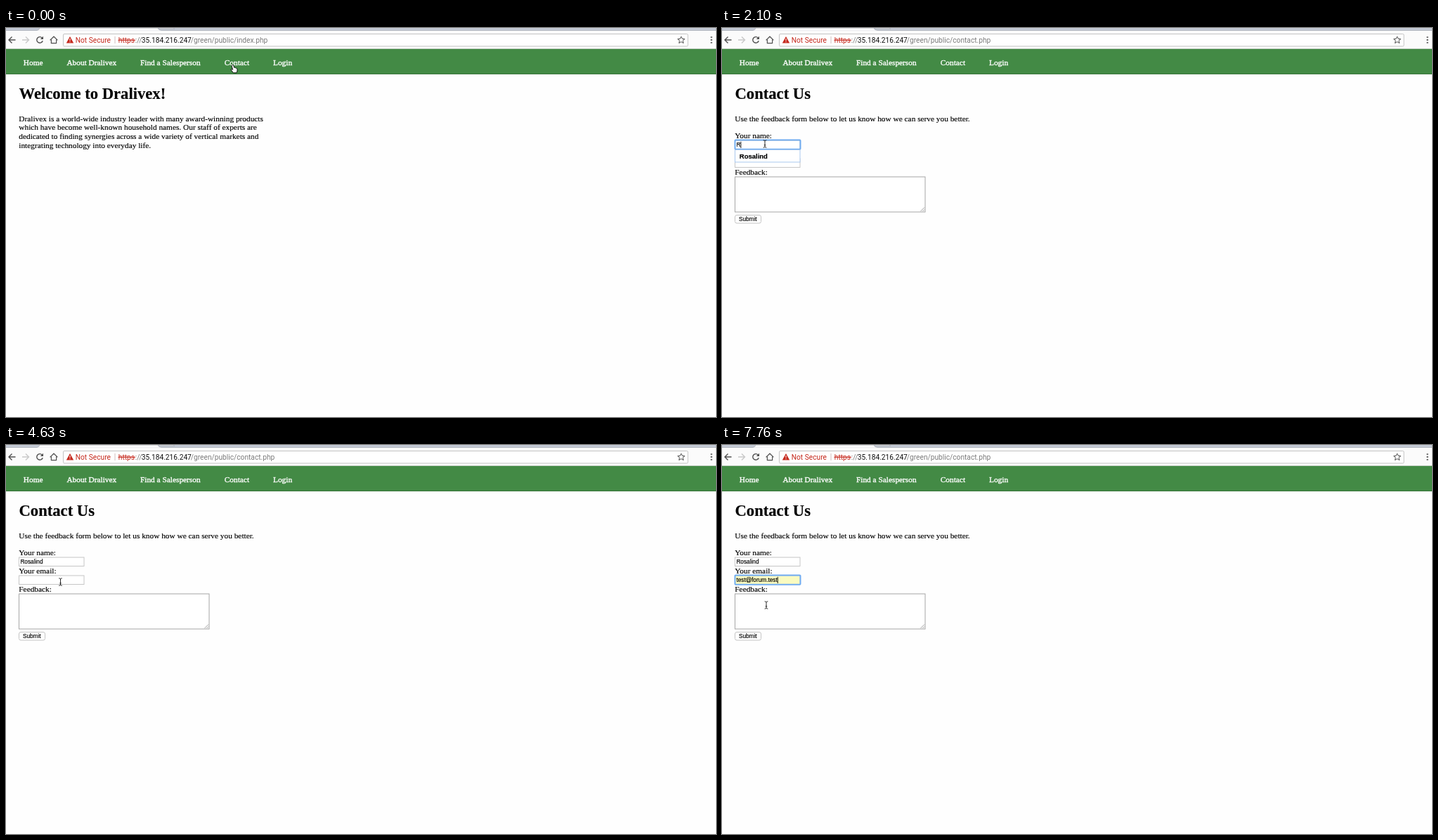
Write an HTML page that moves like this. It is 1010 px wide and 554 px high and loops after 8000 ms.

```html
<!DOCTYPE html>
<html lang="en">
<head>
<meta charset="utf-8">
<title>Contact form</title>
<style>
  html, body { margin: 0; width: 100%; height: 100%; overflow: hidden; background: #fefefe; }
  svg { display: block; }
  text { white-space: pre; }
  .page { font: 11.33px "Liberation Serif", Times, serif; }
  .page text { stroke: #000; stroke-width: .15px; }
  .page .title { font-size: 22.65px; font-weight: bold; }
  .page .nav text { fill: #fff; stroke: #fff; stroke-width: .35px; }
  .url { font: 10.2px Roboto, sans-serif; fill: #7b7b7b; }
  .url .warn { fill: #c5281c; }
  .url .host { fill: #111; }
  .icons { fill: none; stroke: #505050; stroke-width: 1.4; }
  .small { font: 8.25px "Liberation Sans", Arial, sans-serif; }
  .menu { font: bold 9.5px "Liberation Sans", Arial, sans-serif; }
  .field { fill: #fff; stroke: #c6c6c6; }
  .ring { fill: none; stroke: #70acf0; stroke-width: 2; }
  .box { fill: #fff; stroke: #a9c8ee; }
  .caret { stroke: #000; stroke-width: .9; }
</style>
</head>
<body>
<svg width="1010" height="554" viewBox="0 0 1010 554">
  <rect width="1010" height="554" fill="#fefefe"/>

  <!-- browser bar -->
  <rect width="1010" height="30" fill="#fbfbfb"/>
  <rect width="1010" height="3.5" fill="#c4cad5"/>
  <path d="M0 3.5H44Q47 3 48 0H216Q217 3 221 3.5H1010" fill="#fbfbfb" stroke="#a9adb5" stroke-width=".8"/>
  <path d="M217 0Q218 1.5 221 1.5H240L238 0Z" fill="#dfe2e7" stroke="#a9adb5" stroke-width=".6"/>
  <path d="M0 29.5H1010" stroke="#c3cec3"/>
  <rect x="81.5" y="8.5" width="888.5" height="17.5" rx="1.5" fill="#fff" stroke="#c3c3c3"/>
  <g class="icons">
    <path d="M13.5 17H4.5M8.5 12.5L4 17L8.5 21.5"/>
    <path d="M23 17H32M28 12.5L32.5 17L28 21.5" stroke="#c9c9c9"/>
    <g data-on="0 150 470 8000">
      <path d="M51.3 14A4.3 4.3 0 1 0 52.2 18.2"/>
      <path d="M53 11.8V16H48.8Z" fill="#505050" stroke="none"/>
    </g>
    <path data-on="150 470" d="M44 13L52 21M52 13L44 21"/>
    <path d="M62.6 17.4L68 12.2L73.4 17.4M64.4 16.5V21.7H71.6V16.5" stroke-width="1.2"/>
    <path d="M960.5 12L962 15.4L965.5 15.7L962.8 18L963.7 21.6L960.5 19.7L957.3 21.6L958.2 18L955.5 15.7L959 15.4Z" stroke-width="1"/>
    <path d="M1003.5 12.2v1.8M1003.5 16.1v1.8M1003.5 20v1.8" stroke-width="2"/>
  </g>
  <path d="M91 12L96.2 21.4H85.8Z" fill="#c5281c"/>
  <path d="M91 15V18.3M91 19.2V20.3" stroke="#fff"/>
  <path d="M155 12V22" stroke="#d2bcbc"/>
  <g class="url">
    <text class="warn" x="98.8" y="20.6">Not Secure</text>
    <text class="warn" x="159.8" y="20.6">https</text>
    <path d="M159.5 17.4H184" stroke="#c5281c"/>
    <text x="183.8" y="20.6">://</text>
    <text class="host" x="192.8" y="20.6">35.184.216.247</text>
    <text id="path" x="262.8" y="20.6"></text>
  </g>

  <g class="page">
    <g class="nav">
      <rect y="30" width="1010" height="36" fill="#438a45"/>
      <path d="M0 65.5H1010" stroke="#39763b"/>
      <text x="24.8" y="52.5">Home</text>
      <text x="86.4" y="52.5">About Dralivex</text>
      <text x="191" y="52.5">Find a Salesperson</text>
      <text x="310.8" y="52.5">Contact</text>
      <text x="380" y="52.5">Login</text>
    </g>

    <g data-on="0 470">
      <text class="title" x="18.5" y="101.3">Welcome to Dralivex!</text>
      <text x="18.3" y="132.6">Dralivex is a world-wide industry leader with many award-winning products</text>
      <text x="18.3" y="145.4">which have become well-known household names. Our staff of experts are</text>
      <text x="18.3" y="158.1">dedicated to finding synergies across a wide variety of vertical markets and</text>
      <text x="18.3" y="170.9">integrating technology into everyday life.</text>
    </g>

    <g data-on="470 8000">
      <text class="title" x="18.5" y="101.3">Contact Us</text>
      <text x="18.3" y="132.6">Use the feedback form below to let us know how we can serve you better.</text>
      <text x="18.3" y="156.8">Your name:</text>
      <text x="18.3" y="182.8">Your email:</text>
      <text x="18.3" y="208.8">Feedback:</text>
      <rect class="field" x="18.5" y="160" width="92.5" height="12.5"/>
      <rect class="field" x="18.5" y="186" width="92.5" height="12.5"/>
      <rect data-on="7310 8000" x="19" y="186.5" width="91.5" height="11.5" fill="#fafbc0"/>
      <rect x="18.5" y="212" width="270.5" height="50" fill="#fff" stroke="#a6a6a6"/>
      <path d="M282.5 261L288 255.5M285.5 261L288 258.5" stroke="#888" stroke-width=".8"/>
      <rect x="18.5" y="266.5" width="37" height="11.5" rx="2.5" fill="#fff" stroke="#c4c4c4"/>
      <text class="small" x="23.9" y="274.9">Submit</text>

      <rect class="ring" data-on="1650 4180" x="18.5" y="159.5" width="93" height="13.2" rx="1"/>
      <rect class="ring" data-on="4930 8000" x="18.5" y="185.5" width="93" height="13.2" rx="1"/>
      <text class="small" id="name" x="20.4" y="169.2"></text>
      <text class="small" id="email" x="20.4" y="195.2"></text>
      <path class="caret" id="nameCaret" data-on="1650 4180" d="M.5 161.8V171"/>
      <path class="caret" id="emailCaret" data-on="4930 5380 5820 7170 7760 8000" d="M.5 187.8V197"/>

      <g class="menu" data-on="2100 4180">
        <rect class="box" x="18.5" y="173.5" width="92.5" height="17.5"/>
        <text x="24.8" y="186.4">Rosalind</text>
      </g>
      <g class="menu" data-on="6120 7760">
        <rect class="box" x="18.5" y="199.3" width="117.2" height="35.2"/>
        <rect data-on="7310 7460" x="19" y="200.5" width="116.2" height="17" fill="#cdcdcd"/>
        <rect data-on="7460 7760" x="19" y="217.5" width="116.2" height="16.5" fill="#cdcdcd"/>
        <text x="24.8" y="212.6">test@marketplace.test</text>
        <text x="24.8" y="229.6">test@forum.test</text>
      </g>
    </g>
  </g>

  <!-- pointer shapes, each around its hot spot -->
  <g id="pointer">
    <path id="hand" d="M-2.2 -5.2Q-1 -6.2 -.4 -4.8L.6 -1.6Q1.6 -2.4 2.2 -1.2Q3.2 -1.8 3.6 -.6Q4.6 -.8 4.9 .6L5 3L4 5.8H-.6L-3.6 2Q-4.2 .4 -2.6 .6L-1.4 1.4L-2.8 -3.6Q-3 -4.7 -2.2 -5.2Z" fill="#fff" stroke="#000" stroke-width=".9"/>
    <path id="arrow" d="M0 0V10L2.3 8L4 11.6L5.7 10.8L4.1 7.3H7.2Z" fill="#000" stroke="#fff" stroke-width=".8"/>
    <path id="beam" d="M-2.3 -5.2Q-.2 -5.2 0 -4.2Q.2 -5.2 2.3 -5.2M0 -4.2V4.2M-2.3 5.2Q-.2 5.2 0 4.2Q.2 5.2 2.3 5.2M-1.2 1.8H1.2" fill="none" stroke="#111" stroke-width=".9"/>
  </g>
</svg>
<script>
  const LOOP = 8000, STEP = 147, SLACK = 10;
  const NAME = "Rosalind", EMAIL = "test@forum.test", OTHER = "test@marketplace.test";
  const nameKeys = [2100, 2400, 2550, 2700, 3000, 3150, 3290, 3440];
  const emailKeys = [6120, 6270, 6420, 6570];
  // start time, steps, end x, end y
  const moves = [
    [770, 6, 61, 165],
    [3740, 3, 173, 181],
    [4330, 3, 77.5, 195],
    [7310, 2, 63, 228]
  ];
  const el = id => document.getElementById(id);
  const timed = [...document.querySelectorAll("[data-on]")]
    .map(node => ({ node, times: node.dataset.on.split(" ").map(Number) }));
  const show = (node, on) => node.setAttribute("display", on ? "inline" : "none");
  const typed = (text, keys, t) => text.slice(0, keys.filter(k => t >= k).length);

  function pointerAt(t) {
    let x = 324, y = 58;
    for (const [start, steps, endX, endY] of moves) {
      if (t < start) break;
      const p = Math.min(1, (Math.floor((t - start + SLACK) / STEP) + 1) / steps);
      const ease = p * p * (3 - 2 * p);
      x += (endX - x) * ease;
      y += (endY - y) * ease;
    }
    return [x, y];
  }

  function pointerShape(t, x, y) {
    if (t < 770) return "hand";
    if (t >= 7310 && t < 7760) return "arrow";
    const inField = x > 18 && x < 111 && (y > 159 && y < 173 || y > 185 && y < 199);
    const inFeedback = x > 18 && x < 289 && y > 212 && y < 262;
    return inField || inFeedback ? "beam" : "arrow";
  }

  function fill(id, text) {
    el(id).textContent = text;
    const x = 20.4 + (text ? el(id).getComputedTextLength() : 0);
    el(id + "Caret").setAttribute("transform", `translate(${x})`);
  }

  function draw(t) {
    for (const { node, times } of timed)
      show(node, times.filter(s => t >= s).length % 2);

    el("path").textContent = `/green/public/${t < 470 ? "index" : "contact"}.php`;
    fill("name", typed(NAME, nameKeys, t));
    fill("email", t >= 7460 ? EMAIL : t >= 7310 ? OTHER : typed(EMAIL, emailKeys, t));

    const [x, y] = pointerAt(t);
    const shape = pointerShape(t, x, y);
    el("pointer").setAttribute("transform", `translate(${x} ${y})`);
    for (const id of ["hand", "arrow", "beam"]) show(el(id), id === shape);
  }

  const begin = performance.now();
  function tick() {
    draw((performance.now() - begin) % LOOP);
    requestAnimationFrame(tick);
  }
  tick();
</script>
</body>
</html>
```
